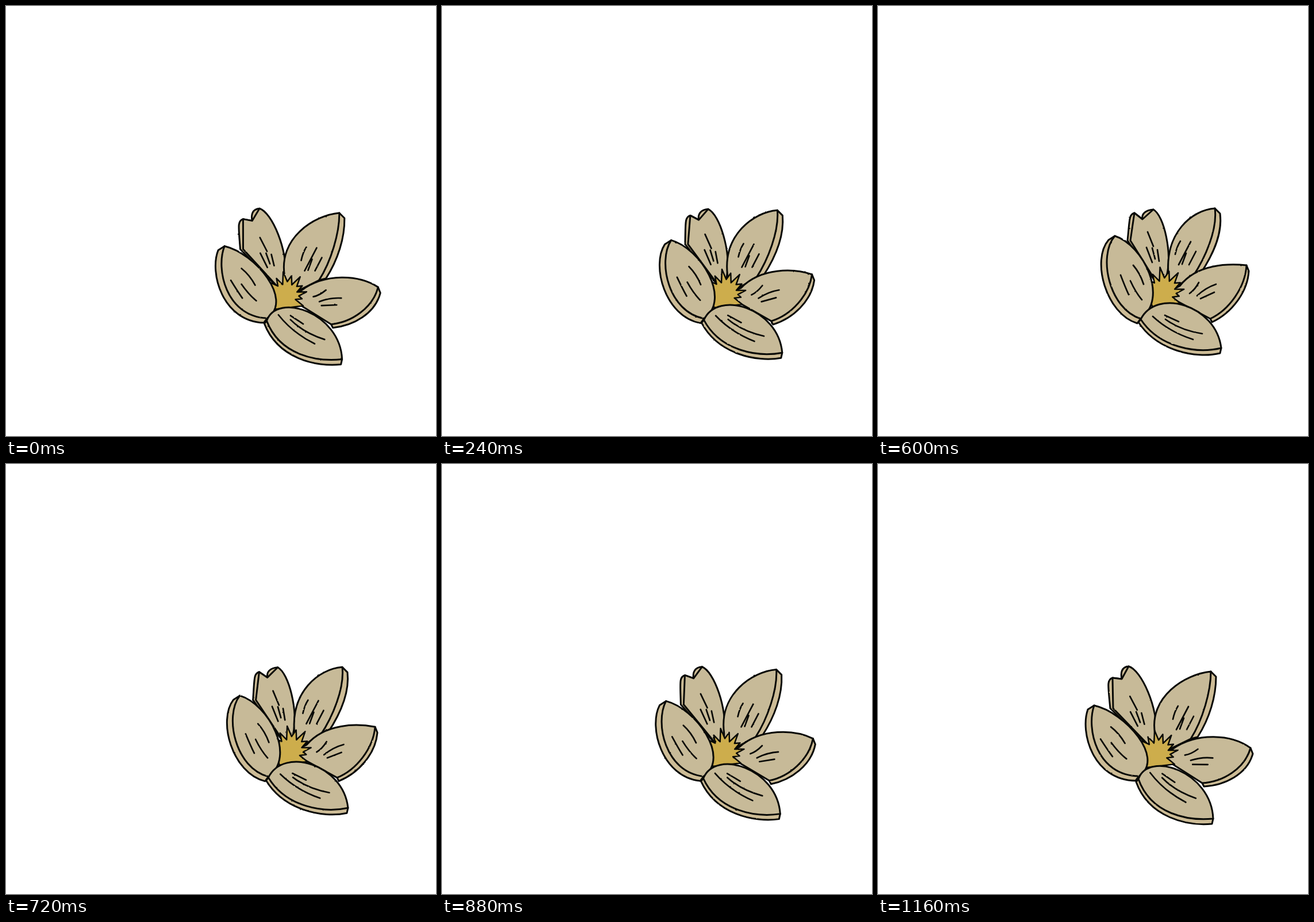
An HTML page that plays this animation: 748x748 px, repeating every 1.24 s.

```html
<!DOCTYPE html>
<html lang="en">
<head>
<meta charset="utf-8">
<title>Flower</title>
<style>
html, body { margin: 0; height: 100%; overflow: hidden; background: #fff; }
svg { display: block; width: 100vw; height: 100vh; }
path { stroke: #080906; stroke-width: 3; stroke-linejoin: round; stroke-linecap: round; }
.side { fill: #cdbc96; }
.face { fill: #c7ba98; }
.star { fill: #cdad4c; stroke-width: 2.5; }
.vein { fill: none; stroke-width: 2.7; }
</style>
</head>
<body>
<svg viewBox="0 0 748 748">
  <filter id="rough" x="340" y="330" width="330" height="320" filterUnits="userSpaceOnUse" color-interpolation-filters="sRGB">
    <feTurbulence type="fractalNoise" baseFrequency=".2" numOctaves="1" seed="4"/>
    <feDisplacementMap in="SourceGraphic" scale="2" xChannelSelector="R" yChannelSelector="G"/>
  </filter>
  <g id="flower" filter="url(#rough)"></g>
</svg>
<script>
const add = (a, b) => [a[0] + b[0], a[1] + b[1]];
const mix = (a, b, u) => [a[0] + (b[0] - a[0]) * u, a[1] + (b[1] - a[1]) * u];
const xy = (...pts) => pts.map(p => p[0].toFixed(2) + ' ' + p[1].toFixed(2)).join(' ');
const points = s => s.split(' ').map(p => p.split(',').map(Number));

// open, shut: tip, then two Bezier sides (control, control, end); the second side shows its thickness.
// lip, foot: thickness at tip and base. Veins are drawn shut; drift and turn carry them to open.
const back = {
  open: '436,352 424,374 408,372 409,425 458,358 488,425 484,472',
  shut: '479,354 460,371 446,360 439,408 498,365 512,430 502,470',
  notched: true, rooted: true, drift: [-28, 10], turn: -6, pivot: [478, 420],
  veins: 'M469 393L479 418M467 420L477 446M477 421L482 440M486 424L489 444'
};
const upper = {
  open: '579,361 535,365 470,405 482,470 579,395 565,445 544,478',
  shut: '586,352 545,355 500,395 505,465 591,390 568,440 548,470',
  rooted: true, lip: [9, 9], foot: [12, -3], drift: [-4, 12], turn: 0, pivot: [535, 430],
  veins: 'M526 409Q520 418 517 432M544 410L523 450M553 427L541 450M536 430L529 449'
};
const right = {
  open: '648,494 615,470 555,466 512,496 638,530 600,553 564,555',
  shut: '641,451 610,448 555,448 525,487 639,488 612,528 578,544',
  rooted: true, lip: [4, 10], foot: [3, 6], drift: [-8, 18], turn: 25, pivot: [568, 494],
  veins: 'M555 504Q570 490 588 484M561 509L585 498M542 500Q551 494 558 481'
};
const left = {
  open: '376,420 430,432 500,512 454,543 362,460 380,542 454,543',
  shut: '412,400 462,416 506,508 457,544 382,435 402,527 457,544',
  lip: [-11, 7], foot: [-6, 8], drift: [-32, 6], turn: -12, pivot: [442, 484],
  veins: 'M422 468Q430 489 436 502M444 451Q456 465 462 484M439 478Q448 498 459 511'
};
const lower = {
  open: '583,617 580,535 470,498 453,548 540,621 475,610 453,548',
  shut: '597,595 588,520 485,490 457,545 555,605 490,595 457,545',
  lip: [-2, 9], foot: [-4, 5], drift: [-8, 4], turn: 10, pivot: [520, 556],
  veins: 'M478 540Q507 567 548 580M500 545Q526 564 564 570M499 538L523 549'
};

const flower = document.getElementById('flower');
function path(kind) {
  const el = document.createElementNS('http://www.w3.org/2000/svg', 'path');
  el.setAttribute('class', kind);
  return flower.appendChild(el);
}

function makePetal(petal) {
  const open = points(petal.open), shut = points(petal.shut);
  const side = path('side'), face = path('face'), vein = path('vein');
  vein.setAttribute('d', petal.veins);
  return (p, root) => {
    const pts = open.map((q, i) => mix(q, shut[i], p));
    const [tip, a1, a2, a3, b1, b2, b3] = pts;
    const tail = petal.rooted ? `L${xy(root)}Z` : 'Z';
    if (petal.notched) {
      // here the first side is notch, second lobe, left end
      side.setAttribute('d', `M${xy(tip)}C${xy(add(tip, [-13, 1]), add(a1, [-2, -10]), a1)}`
        + `L${xy(a2)}C${xy(add(a2, [-10, 3]), add(a2, [-8, 12]), add(a3, [-5, 0]))}L${xy(root)}Z`);
      face.setAttribute('d', `M${xy(a3)}L${xy(a2, a1)}Q${xy(mix(a1, tip, 0.5), tip)}C${xy(b1, b2, b3)}${tail}`);
    } else {
      const { lip, foot } = petal;
      side.setAttribute('d', `M${xy(tip)}L${xy(add(tip, lip))}`
        + `C${xy(add(b1, lip), add(b2, foot), add(b3, foot))}L${xy(b3)}Z`);
      face.setAttribute('d', `M${xy(a3)}C${xy(a2, a1, tip)}C${xy(b1, b2, b3)}${tail}`);
    }
    const { drift, turn, pivot } = petal, q = 1 - p;
    vein.setAttribute('transform',
      `translate(${drift[0] * q} ${drift[1] * q}) rotate(${turn * q} ${pivot})`);
  };
}

function makeStar() {
  const el = path('star'), spikes = 9;
  const polar = (c, angle, r) => add(c, [r * Math.cos(angle), r * Math.sin(angle)]);
  return (p, root) => {
    let d = 'M' + xy(add(root, [-20, 22]));
    for (let i = 0; i < spikes; i++) {
      const step = 0.37, angle = -2.45 + i * step;
      const r = 31 + (10 + 4 * p) * Math.max(0, -Math.sin(angle)) + (i % 2 ? -4 : 2);
      d += 'L' + xy(polar(root, angle, r));
      if (i < spikes - 1) d += 'L' + xy(polar(root, angle + step / 2, r * 0.6));
    }
    el.setAttribute('d', d + 'Z');
  };
}

// later pieces lie on top
const pieces = [makePetal(back), makePetal(upper), makePetal(right), makeStar(), makePetal(left), makePetal(lower)];

const LOOP = 1240, STEP = 40, TURN = 600, HOLD = 280;

// 0 is open, 1 is shut: ease shut, then reopen faster with a short rest
function closing(t) {
  let away = 1 - t / TURN;
  if (t >= TURN) {
    const s = t - TURN;
    away = (s < HOLD ? s : Math.max(HOLD, s - 110)) / 345;
  }
  return 1 - Math.min(1, 0.93 * away) ** 1.7;
}

let shown = -1;
function tick() {
  const t = Math.floor(performance.now() % LOOP / STEP) * STEP;
  if (t !== shown) {
    shown = t;
    const p = closing(t), root = mix([487, 506], [497, 501], p);
    pieces.forEach(draw => draw(p, root));
  }
  requestAnimationFrame(tick);
}
tick();
</script>
</body>
</html>
```
